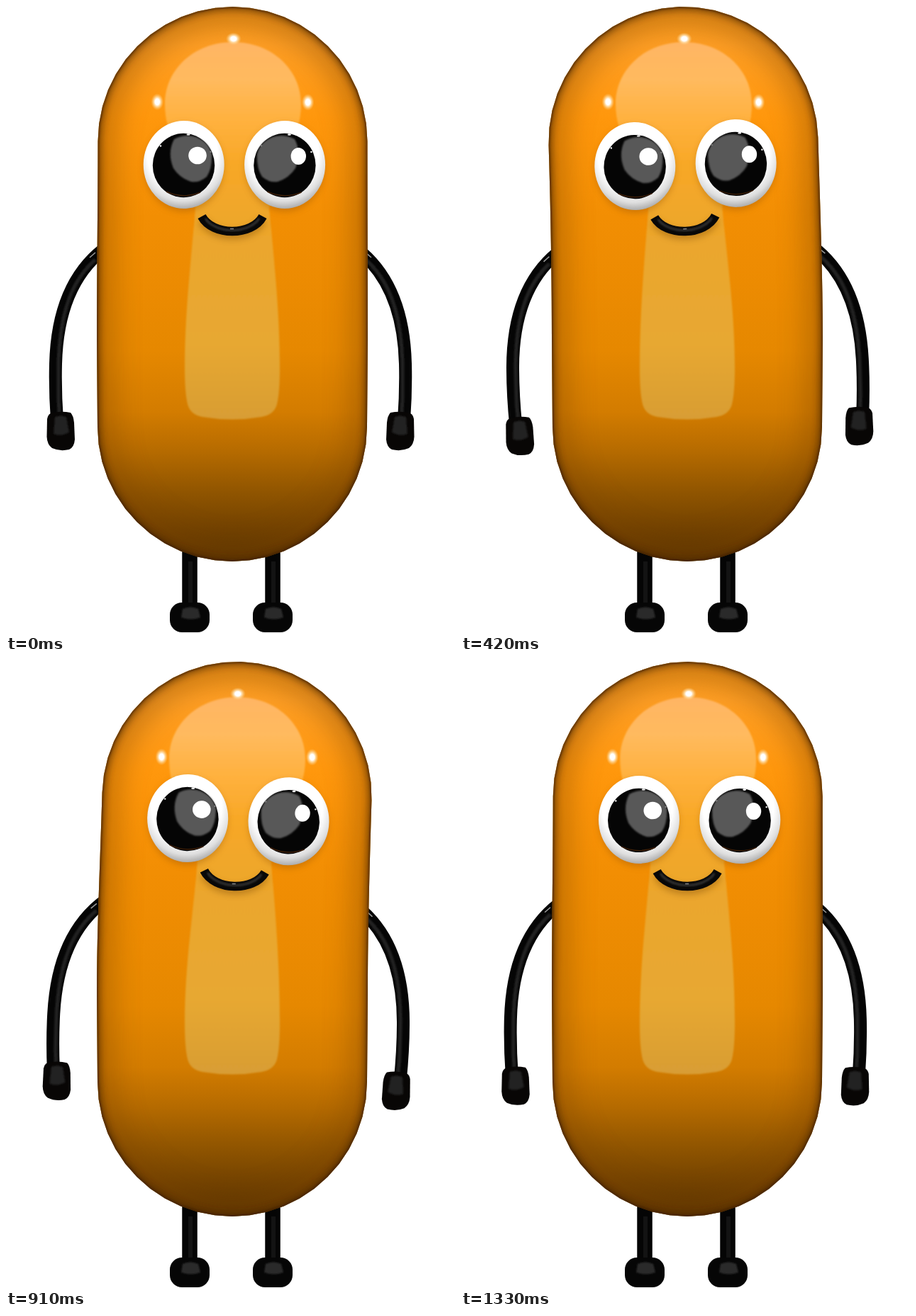
Animation, 633 px wide and 885 px high, one loop 1.4 s. Source, as an HTML page:

```html
<!DOCTYPE html>
<html lang="en">
<head>
<meta charset="utf-8">
<title>Swaying capsule</title>
<style>
  html, body { margin: 0; width: 100%; height: 100%; overflow: hidden; background: #fff; }
  svg { display: block; width: 633px; height: 885px; }
</style>
</head>
<body>
<svg viewBox="0 0 633 885">
  <defs>
    <linearGradient id="skin" gradientUnits="userSpaceOnUse" x1="0" y1="0" x2="0" y2="785">
      <stop offset="0" stop-color="#fb9a1a"/>
      <stop offset=".07" stop-color="#ff9f24"/>
      <stop offset=".2" stop-color="#ff970c"/>
      <stop offset=".38" stop-color="#f28e03"/>
      <stop offset=".62" stop-color="#e68800"/>
      <stop offset=".73" stop-color="#d37c00"/>
      <stop offset=".8" stop-color="#b66b00"/>
      <stop offset=".87" stop-color="#925600"/>
      <stop offset=".94" stop-color="#724200"/>
      <stop offset="1" stop-color="#573200"/>
    </linearGradient>
    <linearGradient id="shine" gradientUnits="userSpaceOnUse" x1="0" y1="51" x2="0" y2="584">
      <stop offset="0" stop-color="#ffb564"/>
      <stop offset=".1" stop-color="#ffba5e"/>
      <stop offset=".21" stop-color="#ffb13e"/>
      <stop offset=".32" stop-color="#f8a827"/>
      <stop offset=".52" stop-color="#eba62d"/>
      <stop offset=".8" stop-color="#e7a832"/>
      <stop offset="1" stop-color="#d89d34"/>
    </linearGradient>
    <radialGradient id="white" cx=".48" cy=".36" r=".66">
      <stop offset=".66" stop-color="#fff"/>
      <stop offset=".84" stop-color="#dedede"/>
      <stop offset="1" stop-color="#a2a2a2"/>
    </radialGradient>
    <radialGradient id="glint">
      <stop offset=".35" stop-color="#fff"/>
      <stop offset=".6" stop-color="#ffe2b0" stop-opacity=".75"/>
      <stop offset="1" stop-color="#ffc46e" stop-opacity="0"/>
    </radialGradient>
    <filter id="wideBlur" x="-20%" y="-20%" width="140%" height="140%"><feGaussianBlur stdDeviation="20"/></filter>
    <filter id="rimBlur" x="-10%" y="-10%" width="120%" height="120%"><feGaussianBlur stdDeviation="5"/></filter>
    <filter id="soft"><feGaussianBlur stdDeviation=".8"/></filter>
    <clipPath id="bodyClip"><path class="outline"/></clipPath>

    <g id="leg">
      <path d="M259 760V850" stroke="#050505" stroke-width="21.5"/>
      <path d="M260 784V842" stroke="#131313" stroke-width="6"/>
      <rect x="231" y="842" width="56" height="42" rx="17" fill="#060606"/>
      <path d="M249 851Q260 846 271 851L274 863Q261 868 247 863Z" fill="#292929" filter="url(#soft)"/>
    </g>
    <g id="arm" fill="none">
      <path d="M138 343C98 374 72 425 70 505Q69 543 72 585" stroke="#050505" stroke-width="18"/>
      <path d="M126 358C94 386 76 430 74 505Q73 542 75 574" stroke="#222" stroke-width="5" filter="url(#soft)"/>
      <path d="M126 348L118 355" stroke="#999" stroke-width="1.6"/>
      <path d="M63 575Q77 571 91 574Q95 578 96 588L97 612Q96 623 89 626Q76 629 65 624Q58 619 57.500 608L58 583Q59 577 63 575Z" fill="#080605"/>
      <path d="M69 580Q78 577 85 580L89 602Q78 608 67 604Z" fill="#202020" filter="url(#soft)"/>
    </g>
    <g id="eye">
      <ellipse cx="250.7" cy="224" rx="57" ry="62" fill="url(#white)"/>
      <ellipse cx="250.5" cy="225" rx="43.7" ry="45.2" fill="#050505"/>
      <path d="M226 262Q250 273 274 263" fill="none" stroke="#3b1d04" stroke-width="1.5"/>
      <ellipse cx="257" cy="181.5" rx="2.5" ry="1.3" fill="#fff"/>
      <circle cx="218" cy="197.5" r="1.2" fill="#fff"/>
      <circle cx="288" cy="206" r="1.2" fill="#fff"/>
    </g>
    <path id="gleam" d="M237 188Q252 180 268 185Q286 192 290 209Q291 229 283 241Q272 250 261 248Q245 243 236 229Q227 207 237 188Z"/>
    <path id="smile" d="M276 297C291 325 347 325 362 297"/>
  </defs>

  <use href="#leg"/>
  <use href="#leg" x="117"/>
  <g class="sway">
    <use href="#arm"/>
    <use href="#arm" transform="matrix(-1 0 0 1 633 0)"/>
  </g>

  <path class="outline" fill="url(#skin)"/>
  <g clip-path="url(#bodyClip)">
    <path class="outline" fill="none" stroke="#7a4300" stroke-width="44" opacity=".42" filter="url(#wideBlur)"/>
    <path id="reflection" fill="url(#shine)" filter="url(#soft)"/>
    <path class="outline" fill="none" stroke="#4a2600" stroke-width="10" opacity=".6" filter="url(#rimBlur)"/>
    <path class="outline" fill="none" stroke="#3a1e00" stroke-width="4" opacity=".55" filter="url(#soft)"/>
  </g>
  <g id="glints" fill="url(#glint)">
    <ellipse cx="320.8" cy="46.3" rx="11" ry="9"/>
    <ellipse cx="213.3" cy="135.3" rx="9" ry="12"/>
    <ellipse cx="425.6" cy="135.8" rx="9" ry="12"/>
  </g>

  <g class="sway">
    <g opacity=".35" filter="url(#rimBlur)">
      <ellipse cx="250.7" cy="228" rx="56" ry="62" fill="#8a4a00"/>
      <ellipse cx="393.1" cy="228" rx="56" ry="62" fill="#8a4a00"/>
      <use href="#smile" y="5" fill="none" stroke="#6a3a00" stroke-width="13"/>
    </g>
    <use href="#eye"/>
    <use href="#eye" x="142.4"/>
    <g fill="#595959" filter="url(#soft)">
      <use href="#gleam"/>
      <use href="#gleam" transform="matrix(-1 0 0 1 644 0)"/>
    </g>
    <g fill="#fff">
      <ellipse cx="270" cy="211" rx="12.8" ry="12.3"/>
      <ellipse cx="412.3" cy="212" rx="10.7" ry="12"/>
    </g>
    <g fill="none">
      <use href="#smile" stroke="#080808" stroke-width="12.5"/>
      <path d="M281 300C296 322 342 322 357 300" stroke="#2d2d2d" stroke-width="3.5" filter="url(#soft)"/>
      <path d="M316 314.5H321" stroke="#888" stroke-width="1.5"/>
    </g>
  </g>
</svg>

<script>
const LOOP = 1400, STEP = 70;
const MAX_ANGLE = 1.8, PIVOT = { x: 319, y: 408 };
const RADIUS = 190, TOP_Y = 191, BOTTOM_Y = 594;
const SEGMENTS = 24;
// time, lean (-1 left, 1 right)
const KEYS = [[0, 0], [350, -1], [980, 1], [1380, 0], [LOOP, 0]];

const all = selector => [...document.querySelectorAll(selector)];
const outlines = all('.outline'), swaying = all('.sway');
const reflection = document.getElementById('reflection');
const glints = document.getElementById('glints');

function leanAt(time) {
  const i = KEYS.findIndex(key => time < key[0]);
  const [t0, a] = KEYS[i - 1], [t1, b] = KEYS[i];
  const ease = 0.5 - Math.cos(Math.PI * (time - t0) / (t1 - t0)) / 2;
  return a + (b - a) * ease;
}

// Faceted half circle, clockwise from the start angle
function dome(cx, cy, start) {
  return Array.from({ length: SEGMENTS + 1 }, (_, i) => {
    const angle = start + Math.PI * i / SEGMENTS;
    return `${cx + RADIUS * Math.cos(angle)} ${cy + RADIUS * Math.sin(angle)}`;
  }).join('L');
}

function bodyPath(shift, tilt) {
  const cx = 319.5 + shift, left = 319 - 191, right = 319 + 191;
  const slant = tilt * 95;
  return `M${left} 470C${left} 380 ${cx - RADIUS - slant} 285 ` +
    dome(cx, TOP_Y, Math.PI + tilt) +
    `C${cx + RADIUS - slant} 285 ${right} 380 ${right} 470L` +
    dome(319, BOTTOM_Y, 0) + 'Z';
}

function reflectionPath(shift) {
  const x = 320 + shift, mid = 320 + shift * 0.45;
  return `M${x} 51C${x + 55} 51 ${x + 96} 90 ${x + 96} 138` +
    `C${x + 96} 195 ${mid + 60} 215 ${mid + 51} 285` +
    `C${mid + 57} 350 386 430 386 510Q386 545 382 562Q378 577 360 580` +
    `Q319 587 277 580Q260 577 256 562Q252 545 252 510` +
    `C252 430 ${mid - 58} 350 ${mid - 53} 285` +
    `C${mid - 60} 215 ${x - 96} 195 ${x - 96} 138C${x - 96} 90 ${x - 55} 51 ${x} 51Z`;
}

function draw(time) {
  const lean = leanAt(time);
  const angle = lean * MAX_ANGLE, tilt = angle * Math.PI / 180;
  const shift = lean * 6.4;
  const body = bodyPath(shift, tilt);
  outlines.forEach(path => path.setAttribute('d', body));
  swaying.forEach(group => group.setAttribute('transform', `rotate(${angle} ${PIVOT.x} ${PIVOT.y})`));
  reflection.setAttribute('d', reflectionPath(shift));
  glints.setAttribute('transform', `translate(${shift} 0)`);
}

const begin = performance.now();
function tick() {
  const time = (performance.now() - begin) % LOOP;
  draw(Math.floor(time / STEP) * STEP);
  requestAnimationFrame(tick);
}
draw(0);
requestAnimationFrame(tick);
</script>
</body>
</html>
```
